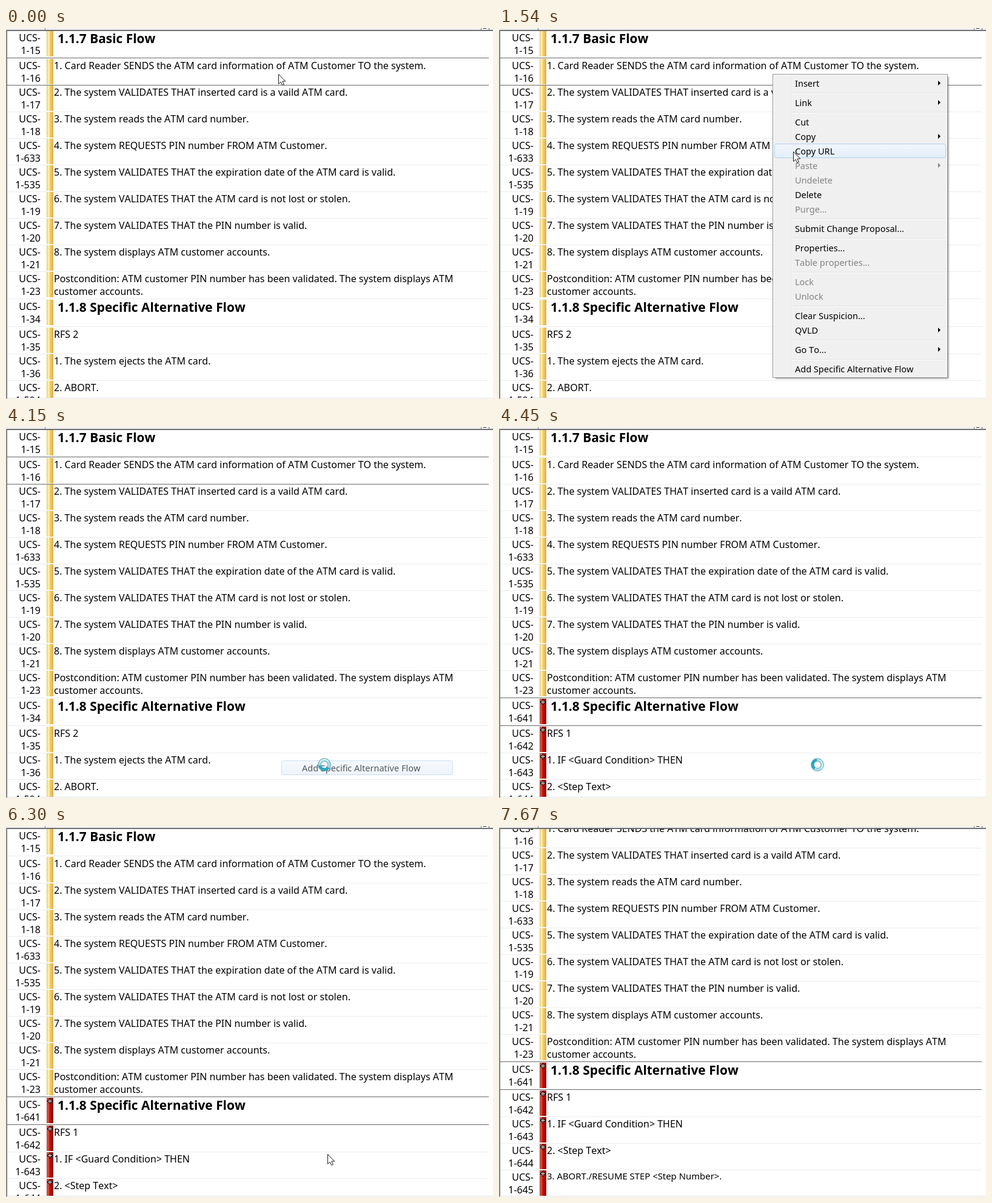
An HTML page with a canvas for the animation above (8.76 s loop, 803 by 613 pixels).

```html
<!DOCTYPE html>
<html lang="en">
<head>
<meta charset="utf-8">
<title>Adding an alternative flow</title>
<style>
html, body { margin: 0; width: 100%; height: 100%; overflow: hidden; background: #fff; }
canvas { display: block; }
</style>
</head>
<body>
<canvas id="stage" width="803" height="613"></canvas>
<script>
const ctx = document.getElementById('stage').getContext('2d');
const LOOP = 8760;
const FONT = '"Noto Sans", "Open Sans", sans-serif';
ctx.fontKerning = 'none';

// Each row: label number, text, style (h = heading, t = two lines, s = small)
const shared = [
  ['15', '1.1.7 Basic Flow', 'h'],
  ['16', '1. Card Reader SENDS the ATM card information of ATM Customer TO the system.'],
  ['17', '2. The system VALIDATES THAT inserted card is a vaild ATM card.'],
  ['18', '3. The system reads the ATM card number.'],
  ['633', '4. The system REQUESTS PIN number FROM ATM Customer.'],
  ['535', '5. The system VALIDATES THAT the expiration date of the ATM card is valid.'],
  ['19', '6. The system VALIDATES THAT the ATM card is not lost or stolen.'],
  ['20', '7. The system VALIDATES THAT the PIN number is valid.'],
  ['21', '8. The system displays ATM customer accounts.'],
  ['23', 'Postcondition: ATM customer PIN number has been validated. The system displays ATM|customer accounts.', 't']
];
const before = [...shared,
  ['34', '1.1.8 Specific Alternative Flow', 'h'],
  ['35', 'RFS 2'],
  ['36', '1. The system ejects the ATM card.'],
  ['594', '2. ABORT.']
];
const after = [...shared,
  ['641', '1.1.8 Specific Alternative Flow', 'h'],
  ['642', 'RFS 1'],
  ['643', '1. IF <Guard Condition> THEN'],
  ['644', '2. <Step Text>'],
  ['645', '3. ABORT./RESUME STEP <Step Number>.', 's']
];

// '-' separator, '>' submenu, '~' disabled
const menu = ['>Insert', '-', '>Link', '-', 'Cut', '>Copy', 'Copy URL', '>~Paste', '~Undelete', 'Delete',
  '~Purge...', '-', 'Submit Change Proposal...', '-', 'Properties...', '~Table properties...', '-',
  '~Lock', '~Unlock', '-', 'Clear Suspicion...', '>QVLD', '-', '>Go To...', '-',
  'Add Specific Alternative Flow'];
const LAST_ITEM_Y = 551;

// [time, x, y, busy]; no position means hidden
const pointer = [
  [0, 449, 76], [1240, 457, 105], [1390, 470, 150], [1540, 485, 204], [1690, 497, 300], [1840, 506, 378],
  [2150, 511, 425], [2300, 516, 475], [2450, 520, 522], [2600, 523, 550], [2750, 525, 558],
  [4150, 525, 558, true], [5230, 525, 558], [5380, 525, 541], [5530, 526, 520], [5680, 527, 523],
  [6300, 530, 542], [6450, 532, 560], [6750], [7060, 533, 568], [7370, 535, 584], [7520, 537, 600], [7670]
];

function rect(x, y, w, h, fill) {
  ctx.fillStyle = fill;
  ctx.fillRect(x, y, w, h);
}

function text(str, x, y, size, color = '#000', align = 'left', weight = 400) {
  ctx.font = `${weight} ${size}px ${FONT}`;
  ctx.textAlign = align;
  ctx.fillStyle = color;
  ctx.fillText(str, x, y);
}

function shades(x0, y0, x1, y1, ...stops) {
  const g = ctx.createLinearGradient(x0, y0, x1, y1);
  stops.forEach((c, i) => g.addColorStop(i / (stops.length - 1), c));
  return g;
}

function drawRows(rows, selected, scroll) {
  ctx.save();
  ctx.beginPath();
  ctx.rect(2, 5, 801, 606);
  ctx.clip();
  const gold = shades(67, 0, 78, 0, '#e0b964', '#fff3ae', '#fbe38e', '#efc45f', '#e9bd5c', '#d9a54a');
  const red = shades(67, 0, 78, 0, '#b04030', '#d8604c', '#c82014', '#b80c04', '#a00800', '#7c0600');
  let top = 4 - scroll;
  rows.forEach(([id, str, style], i) => {
    const tall = style === 'h' || style === 't';
    const isNew = rows === after && i >= shared.length;
    text('UCS-', 57, top + 18, 16, '#000', 'right');
    text('1-' + id, 57, top + 39, 16, '#000', 'right');
    rect(67, top + 1, 11, 42, isNew ? red : gold);
    if (isNew) {
      rect(68, top + 5, 9, 3, '#000');
      rect(71, top + 2, 3, 9, '#000');
      rect(69, top + 6, 7, 1, '#fff');
      rect(72, top + 3, 1, 7, '#fff');
    }
    if (style === 'h') text(str, 85, top + 21, 20.9, '#000', 'left', 700);
    else if (style === 's') text(str, 79, top + 16, 14.9);
    else str.split('|').forEach((line, n) => text(line, 79, top + 18 + n * 21, 16));
    const marked = i === selected || i === selected - 1;
    rect(2, top + (tall ? 45 : 44), 794, 1, marked ? '#696969' : '#ececec');
    top += tall ? 46 : 44;
  });
  ctx.restore();
}

function drawFrame() {
  rect(0, 0, 803, 3, '#f0f0f0');
  rect(64, 0, 1, 3, '#808080');
  rect(783, 0, 1, 3, '#808080');
  rect(787, 0, 5, 1, '#303030');
  rect(796, 0, 1, 3, '#696969');
  rect(0, 3, 803, 1, '#808080');
  rect(0, 4, 803, 1, '#606060');
  rect(0, 3, 1, 610, '#a0a0a0');
  rect(1, 4, 1, 608, '#696969');
  rect(2, 611, 801, 1, '#e3e3e3');
}

function drawHighlight(y, disabled) {
  ctx.beginPath();
  ctx.roundRect(454.5, y + .5, 282, 23, 3);
  ctx.fillStyle = disabled ? shades(0, y, 0, y + 24, '#f0f0f0', '#e7e7e7')
    : shades(0, y, 0, y + 24, '#f1f5fb', '#e3eefa');
  ctx.fill();
  ctx.strokeStyle = disabled ? '#d3d3d3' : '#aed0f2';
  ctx.lineWidth = 1;
  ctx.stroke();
}

function drawItem(item, y, hot) {
  const disabled = item.includes('~');
  const color = disabled ? '#838383' : '#000';
  if (hot) drawHighlight(y, disabled);
  text(item.replace(/[>~]/g, ''), 488, y + 18, 14.5, color);
  if (item[0] === '>') {
    ctx.beginPath();
    ctx.moveTo(724, y + 8);
    ctx.lineTo(728, y + 12);
    ctx.lineTo(724, y + 16);
    ctx.fill();
  }
}

function drawMenu(mouseY, alpha) {
  ctx.save();
  ctx.globalAlpha = alpha;
  for (let i = 0; i < 4; i++) {
    ctx.fillStyle = `rgba(0,0,0,${.09 + i * .03})`;
    ctx.beginPath();
    ctx.roundRect(455, 80, 288 - i, 501 - i, 3);
    ctx.fill();
  }
  rect(451, 76, 289, 502, '#979797');
  rect(452, 77, 287, 500, '#f5f5f5');
  rect(454, 79, 283, 496, '#f0f0f0');
  rect(481, 79, 1, 496, '#e9eaea');
  let y = 79;
  for (const item of menu) {
    if (item === '-') {
      rect(483, y + 4, 254, 1, '#e0e0e0');
      rect(483, y + 5, 254, 1, '#fff');
      y += 8;
    } else {
      drawItem(item, y, mouseY >= y && mouseY < y + 24);
      y += 24;
    }
  }
  ctx.restore();
}

function drawArrow(x, y) {
  ctx.save();
  ctx.translate(x + .5, y + .5);
  ctx.beginPath();
  [[0, 0], [0, 16], [3.6, 12.6], [6.2, 18], [8.8, 16.9], [6.4, 11.5], [11.3, 11.5]]
    .forEach(p => ctx.lineTo(...p));
  ctx.closePath();
  ctx.fillStyle = '#fff';
  ctx.fill();
  ctx.strokeStyle = '#1c1c2c';
  ctx.lineWidth = 1;
  ctx.stroke();
  ctx.restore();
}

function drawBusy(x, y, turn) {
  const ring = (r, w, color, a = 0, b = Math.PI * 2) => {
    ctx.beginPath();
    ctx.arc(x, y, r, a, b);
    ctx.lineWidth = w;
    ctx.strokeStyle = color;
    ctx.stroke();
  };
  ring(8, 5.5, '#5b9fb4');
  ring(8, 4, '#a9dbe8');
  ring(8, 4, '#2aa7bd', turn, turn + 2.4);
  ring(8.6, 1.4, '#e6f8fb', turn + 3, turn + 5);
}

function draw(t) {
  const [, x, y, busy] = pointer.findLast(p => p[0] <= t);
  const done = t >= 4450;
  const scroll = t < 6600 ? 0 : t < 7520 ? 38 : 58;
  rect(0, 0, 803, 613, '#fff');
  drawRows(done ? after : before, done ? shared.length : 1, scroll);
  drawFrame();
  if (t >= 310 && t < 4150) drawMenu(t < 1240 ? 0 : y, t < 460 ? .55 : 1);
  if (t >= 4150 && t < 4300) {
    ctx.globalAlpha = .65;
    drawItem(menu.at(-1), LAST_ITEM_Y, true);
    ctx.globalAlpha = 1;
  }
  if (busy) drawBusy(x, y, Math.min(2, Math.floor((t - 4150) / 150)) * .8 + .6);
  else if (x) drawArrow(x, y);
}

const start = performance.now();
function tick() {
  draw((performance.now() - start) % LOOP);
  requestAnimationFrame(tick);
}
tick();
</script>
</body>
</html>
```
